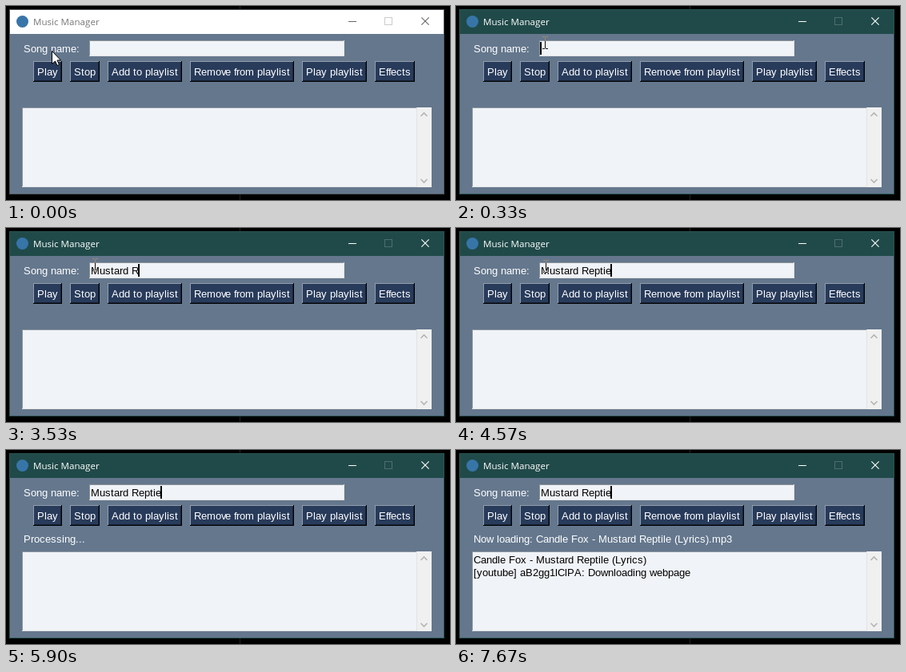
An HTML page with a canvas for the animation above (8 s loop, 555 px wide and 243 px high).

```html
<!DOCTYPE html>
<html lang="en">
<head>
<meta charset="utf-8">
<title>Music Manager</title>
<style>
html, body { margin: 0; width: 100%; height: 100%; overflow: hidden; background: #000; }
canvas { display: block; }
</style>
</head>
<body>
<canvas id="stage" width="555" height="243"></canvas>
<script>
const ctx = document.getElementById('stage').getContext('2d');
const LOOP = 8000, FOCUS = 315;
const UI = '13px "Liberation Sans", Arial, sans-serif';
const TITLE = '11.6px "Open Sans", "Noto Sans", sans-serif';

const SONG = 'Mustard Reptie';
const FOUND = 'Candle Fox - Mustard Reptile (Lyrics)';
const KEYS = [1000, 1270, 2470, 2900, 3000, 3100, 3200, 3300, 3530, 3670, 3770, 3870, 3930, 4030];
const BLINKS = [970, 1900, 2800, 3720, 4630, 5530, 6470, 7370];
const BUTTONS = [
  ['Play', 34, 36], ['Stop', 80, 37], ['Add to playlist', 127, 93],
  ['Remove from playlist', 230, 130], ['Play playlist', 370, 81], ['Effects', 461, 50]
];

// Hinted text advances by whole pixels; f and v come out narrow.
const HINTED = { f: 3, v: 5 };
const advance = c => HINTED[c] || Math.round(ctx.measureText(c).width);
function textWidth(s) {
  ctx.font = UI;
  return [...s].reduce((w, c) => w + advance(c), 0);
}
function text(s, x, y, color) {
  ctx.font = UI;
  ctx.fillStyle = color;
  for (const c of s) {
    ctx.fillText(c, x, y);
    x += advance(c);
  }
}

function rect(x, y, w, h, color) {
  ctx.fillStyle = color;
  ctx.fillRect(x, y, w, h);
}

function bevel(x, y, w, h, fill, lit, shade) {
  rect(x, y, w, h, shade);
  rect(x, y, w - 1, h - 1, lit);
  rect(x + 1, y + 1, w - 2, h - 2, fill);
}

function line(points, color, width = 1) {
  ctx.beginPath();
  points.forEach(([x, y]) => ctx.lineTo(x, y));
  ctx.strokeStyle = color;
  ctx.lineWidth = width;
  ctx.stroke();
}

function drawWindow(focused) {
  rect(0, 0, 555, 243, '#000');
  rect(292, 0, 1, 243, '#222');
  rect(4, 4, 544, 232, focused ? '#2a5453' : '#505458');
  rect(5, 5, 542, 30, focused ? '#204a49' : '#fff');
  rect(5, 35, 542, 200, '#64778d');

  ctx.fillStyle = '#3775a9';
  ctx.beginPath();
  ctx.arc(20.5, 19.5, 7.5, 0, 7);
  ctx.fill();
  ctx.font = TITLE;
  ctx.fillStyle = focused ? '#fff' : '#777';
  ctx.fillText('Music Manager', 34, 24);

  const icon = focused ? '#fff' : '#666';
  rect(428, 19, 10, 1, icon);
  ctx.strokeStyle = focused ? '#4d6e6d' : '#ccc';
  ctx.lineWidth = 1;
  ctx.strokeRect(473.5, 14.5, 9, 9);
  line([[519.4, 14.4], [528.6, 23.6]], icon, 1.1);
  line([[528.6, 14.4], [519.4, 23.6]], icon, 1.1);
}

function drawForm() {
  text('Song name:', 22, 58, '#fff');
  bevel(104, 43, 319, 20, '#f0f3f7', '#8d949c', '#e3e3e3');
  for (const [label, x, w] of BUTTONS) {
    bevel(x, 69, w, 26, '#283b5b', '#939dad', '#000');
    rect(x + 1, 93, w - 2, 1, '#182337');
    rect(x + w - 2, 70, 1, 24, '#182337');
    text(label, x + Math.round((w - textWidth(label)) / 2), 87, '#fff');
  }
  bevel(20, 127, 494, 100, '#f0f3f7', '#8d949c', '#e3e3e3');
  rect(514, 127, 18, 100, '#f0f0f0');
  line([[518.5, 138], [522.5, 134], [526.5, 138]], '#b4b4b4', 1.6);
  line([[518.5, 217], [522.5, 221], [526.5, 217]], '#b4b4b4', 1.6);
}

function drawContent(t) {
  const typed = SONG.slice(0, KEYS.filter(k => t >= k).length);
  text(typed, 106, 58, '#000');
  const blinkedOff = BLINKS.some(b => t >= b && t < b + 300);
  if (t >= FOCUS && !blinkedOff) rect(105 + textWidth(typed), 45, 2, 16, '#000');

  if (t >= 7300) text('Now loading: ' + FOUND + '.mp3', 22, 116, '#fff');
  else if (t >= 5230) text('Processing...', 22, 116, '#fff');
  if (t >= 6470) text(FOUND, 22, 142, '#000');
  if (t >= 6800) text('[youtube] aB2gg1lClPA: Downloading webpage', 22, 158, '#000');
}

// Three moves: to the field, a nudge, then an arc away to the upper right.
const progress = (t, from, to) => Math.min(Math.max((t - from) / (to - from), 0), 1);
function pointerAt(t) {
  if (t < 4540) {
    const u = progress(t, 15, 300), e = u * u * (3 - 2 * u);
    return [57 + 54 * e, 56 - 10 * e];
  }
  if (t < 5700) {
    const u = progress(t, 4540, 4630);
    return [111 + 11 * u * u, 46 + 6 * u];
  }
  const u = progress(t, 5700, 5870);
  return [122 + 279 * u ** 1.5, 52 + 60 * u - 100 * u * u];
}

function drawPointer(t) {
  if (t >= 5890) return;
  const [x, y] = pointerAt(t).map(Math.round);
  if (x >= 104 && x < 423 && y >= 43 && y < 63) {
    // The text pointer inverts what is under it.
    ctx.globalCompositeOperation = 'difference';
    for (const top of [y - 8, y + 7]) {
      rect(x - 3, top, 3, 1, '#fff');
      rect(x + 1, top, 3, 1, '#fff');
    }
    rect(x, y - 7, 1, 14, '#fff');
    ctx.globalCompositeOperation = 'source-over';
    return;
  }
  ctx.save();
  ctx.translate(x + .5, y + .5);
  ctx.beginPath();
  [[0, 0], [0, 16], [4, 12.5], [6.5, 18], [9, 17], [6.5, 11.5], [11, 11.5]]
    .forEach(([px, py]) => ctx.lineTo(px, py));
  ctx.closePath();
  ctx.fillStyle = '#fff';
  ctx.fill();
  ctx.strokeStyle = '#000';
  ctx.lineWidth = 1;
  ctx.stroke();
  ctx.restore();
}

const start = performance.now();
function frame() {
  const t = (performance.now() - start) % LOOP;
  drawWindow(t >= FOCUS);
  drawForm();
  drawContent(t);
  drawPointer(t);
  requestAnimationFrame(frame);
}
frame();
</script>
</body>
</html>
```
